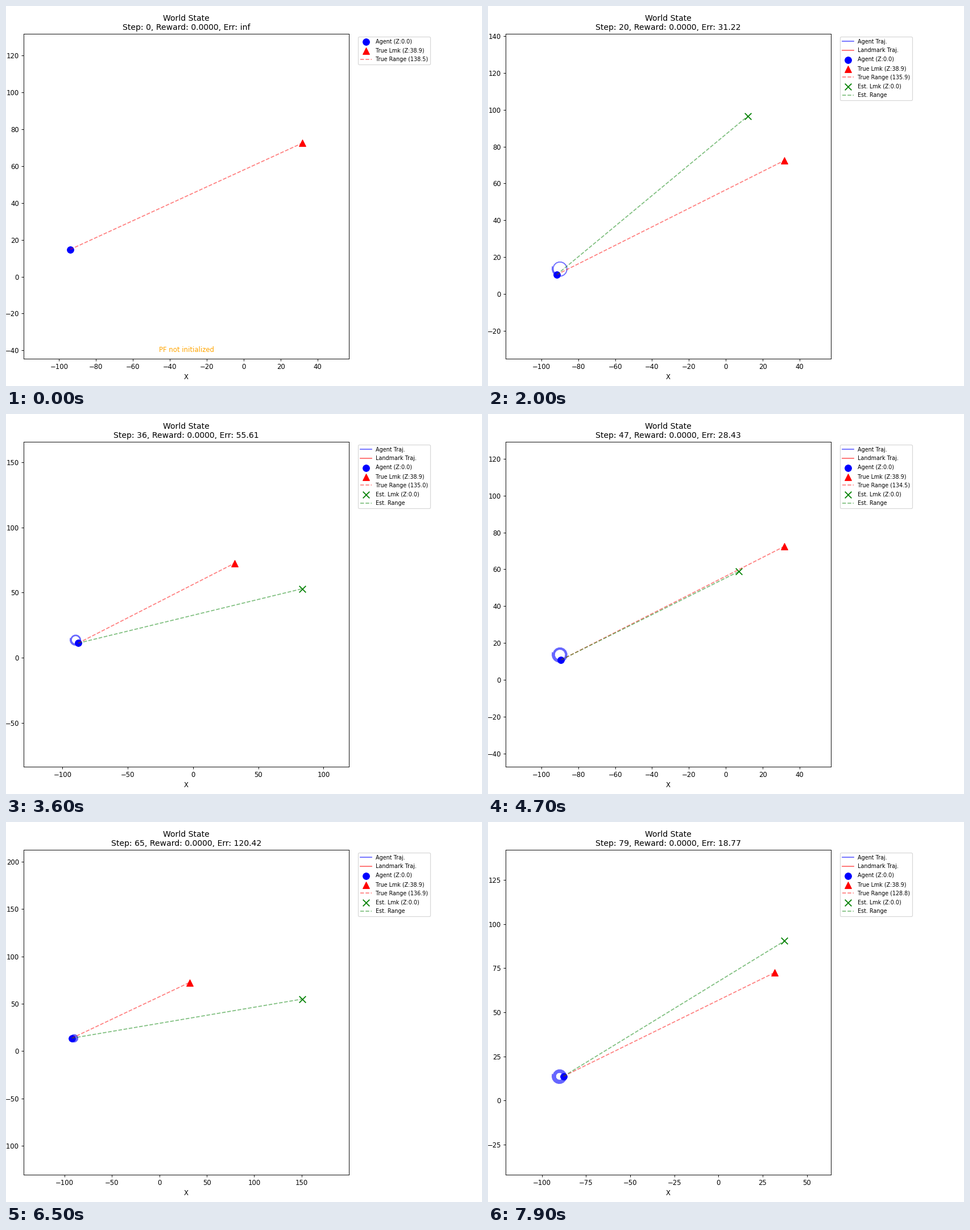
These frames come from a looping animation (837x669 px, 8 s). A matplotlib script:

```python
import numpy as np
import matplotlib.pyplot as plt
from matplotlib.animation import FuncAnimation

W, H, DPI = 837, 669, 83.7
STEPS = 80

plt.rcParams["font.family"] = "DejaVu Sans"

CENTER = np.array([-90.0, 13.65])
LANDMARK = np.array([31.8, 72.5])

# Agent: an inward spiral that turns faster as it tightens
t = np.arange(STEPS)
theta = np.radians(164.6 + 19.16 * t + 0.135 * t ** 2)
radius = 4.2 * np.exp(-0.008 * t)
path = CENTER + (radius * [np.cos(theta), np.sin(theta)]).T

# Landmark estimate: wanders between a few (step, x, y) waypoints
WAYPOINTS = [(13, 1.7, 132.8), (27, 22.0, 60.22), (36, 83.88, 53.0),
             (47, 6.9, 58.78), (65, 150.94, 55.0), (79, 37.4, 90.41)]
when, est_x, est_y = zip(*WAYPOINTS)
estimate = np.column_stack([np.interp(t, when, est_x),
                            np.interp(t, when, est_y)])
error = np.hypot(*(estimate - LANDMARK).T)

# Range readings carry sensor noise after the first step
noise = np.random.default_rng(4).normal(-1.2, 1.7, STEPS)
reading = np.hypot(*(LANDMARK - path).T) + np.where(t > 0, noise, 0)

fig = plt.figure(figsize=(W / DPI, H / DPI + 1e-9), dpi=DPI, facecolor="white")
ax = fig.add_axes([31.1 / W, 48.1 / H, 572 / W, 572 / H])


def link(a, b, color, label):
    ax.plot([a[0], b[0]], [a[1], b[1]], color + "--", alpha=0.5, label=label)


def mark(p, color, marker, label):
    ax.scatter(*p, c=color, marker=marker, s=100, label=label)


def fit_view(points):
    """Square view around all points with a 20 % margin."""
    low, high = points.min(axis=0), points.max(axis=0)
    mid, half = (low + high) / 2, 0.7 * (high - low).max()
    ax.set_xlim(mid[0] - half, mid[0] + half)
    ax.set_ylim(mid[1] - half, mid[1] + half)


def draw(i):
    ax.clear()
    agent, est = path[i], estimate[i]
    trail = path[:i + 1]
    points = [trail, [LANDMARK]]

    if i > 0:
        ax.plot(*trail.T, "b-", alpha=0.6, label="Agent Traj.")
        ax.plot(*np.tile(LANDMARK, (2, 1)).T, "r-", alpha=0.6,
                label="Landmark Traj.")
    mark(agent, "blue", "o", "Agent (Z:0.0)")
    mark(LANDMARK, "red", "^", "True Lmk (Z:38.9)")
    link(agent, LANDMARK, "r", f"True Range ({reading[i]:.1f})")

    if i > 0:
        mark(est, "green", "x", "Est. Lmk (Z:0.0)")
        link(agent, est, "g", "Est. Range")
        points.append([est])
        err = f"{error[i]:.2f}"
    else:
        ax.text(0.5, 0.02, "PF not initialized", color="orange",
                ha="center", transform=ax.transAxes)
        err = "inf"

    fit_view(np.vstack(points))
    ax.set_title(f"World State\nStep: {i}, Reward: 0.0000, Err: {err}")
    ax.set_xlabel("X")
    ax.legend(loc="upper left", bbox_to_anchor=(1.02, 1),
              fontsize="small", labelspacing=0.6)
    return []


anim = FuncAnimation(fig, draw, frames=STEPS, init_func=lambda: draw(0),
                     interval=100, repeat=True, repeat_delay=0)
plt.show()
```
